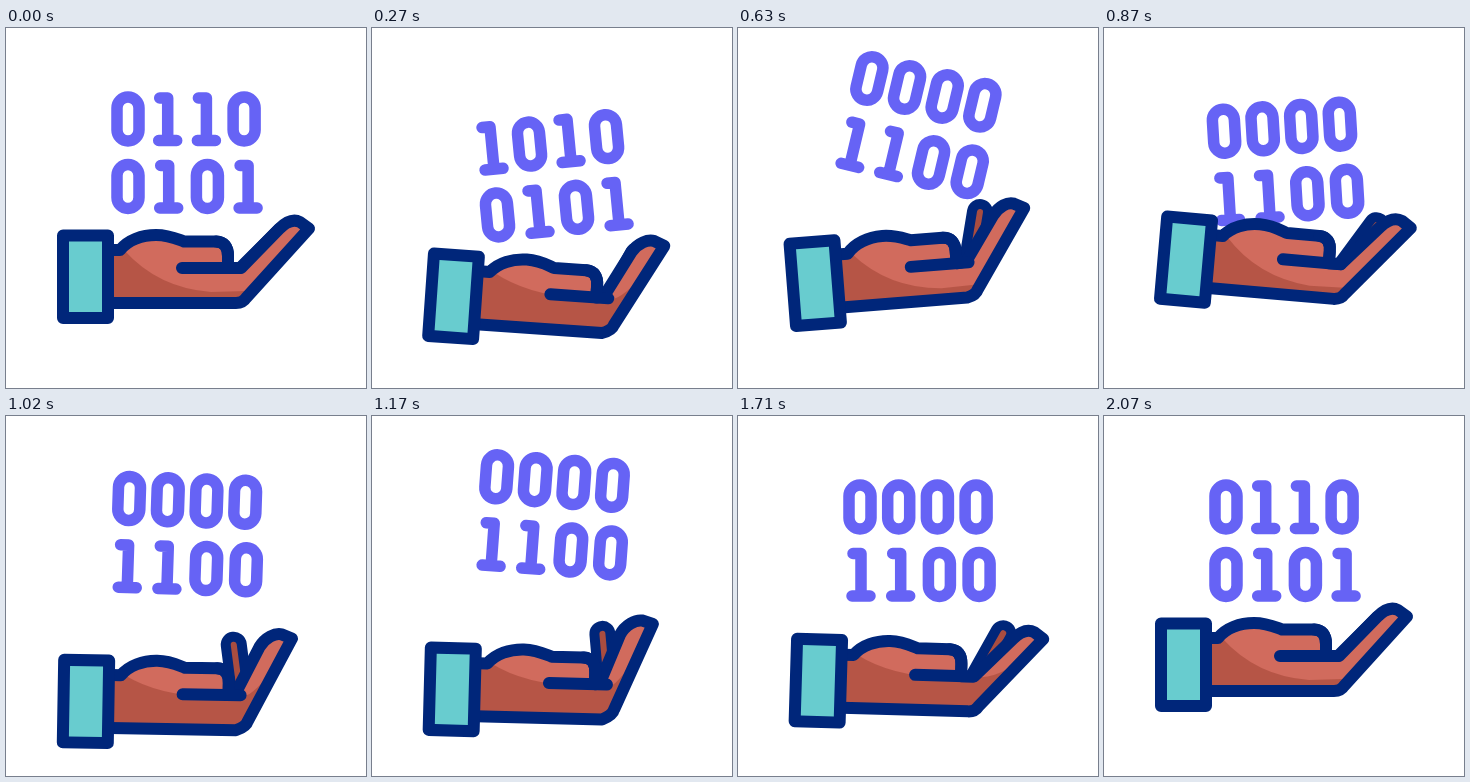
Animation of 360x360 px, one loop 2.1 s. Source, as an HTML page:

```html
<!DOCTYPE html>
<html lang="en">
<head>
<meta charset="utf-8">
<title>Hand tossing binary digits</title>
<style>
  html, body { margin: 0; width: 100%; height: 100%; overflow: hidden; background: #fff; }
  svg { display: block; width: 100vw; height: 100vh; }
  path, rect { stroke-linecap: round; stroke-linejoin: round; }
  .line { fill: none; stroke: #00267a; stroke-width: 12; }
  #digits { fill: none; stroke: #6663f5; stroke-width: 11.5; }
</style>
</head>
<body>
<svg viewBox="0 0 360 360">
  <clipPath id="skin"><path id="skinShape"/></clipPath>
  <g id="digits"></g>
  <g id="hand">
    <path id="backEdge" fill="none" stroke="#00267a" stroke-width="26"/>
    <path id="backFill" fill="none" stroke="#a94d40" stroke-width="6"/>
    <path id="body" fill="#b65546"/>
    <path id="light" fill="#d16b5d" clip-path="url(#skin)"/>
    <path id="outline" class="line"/>
    <path class="line" d="M176 240H234M210 213.500Q222 214 222 228V238"/>
    <rect class="line" x="57" y="207.500" width="45" height="82.500" style="fill:#68cccf"/>
  </g>
</svg>
<script>
const LOOP = 2100, STEP = 30;
const $ = id => document.getElementById(id);
const radians = degrees => degrees * Math.PI / 180;

function ramp(t, from, to) {
  const u = Math.min(1, Math.max(0, (t - from) / (to - from)));
  return u * u * (3 - 2 * u);
}

// Sum of smooth humps, each [centre time, height, half width].
const humps = (t, ...list) => list.reduce((sum, [at, height, half]) => {
  const u = Math.abs(t - at) / half;
  return u < 1 ? sum + height * Math.cos(u * Math.PI / 2) ** 2 : sum;
}, 0);

function poseAt(t) {
  // Three dips of the hand, with one quick lift to meet the falling digits.
  const handY = humps(t, [420, 44, 280], [850, -36, 170], [1040, 37, 330], [1640, 17, 430]);
  const turn = humps(t, [270, 4, 200], [630, -4.5, 210], [870, 5, 200], [1170, 1.5, 200], [1700, 1.7, 300]);
  const digitsY = humps(t, [330, 27, 240], [630, -28, 200], [890, 9, 150], [1170, -26, 230], [1430, 10, 180]);
  return {
    handY, turn, digitsY,
    handX: turn / 2,
    digitsTurn: -0.48 * digitsY * Math.exp(-(((t - 670) / 480) ** 2)),
    bend: humps(t, [300, -14, 300], [640, -8, 230], [1130, -20, 330]),
    spread: (20 + handY / 2) * ramp(t, 150, 550) * (1 - ramp(t, 1500, 2000)),
    shade: ramp(handY, 6, 14)
  };
}

const codes = [[0, "01100101"], [150, "10100101"], [450, "00001100"], [1890, "01100101"]];
const glyphs = {
  0: "M-11 -11A11 11 0 0 1 11 -11V11A11 11 0 0 1 -11 11Z",
  1: "M-7 -21H1V21M-8 21.500H10"
};
const digits = Array.from({ length: 8 }, (_, i) => {
  const path = document.createElementNS("http://www.w3.org/2000/svg", "path");
  const row = Math.floor(i / 4);
  const x = 122 + (i % 4) * (38.7 + row), y = 91 + row * 67.5;
  path.setAttribute("transform", `translate(${x} ${y})`);
  return $("digits").appendChild(path);
});

// Turns a finger point about the knuckle.
function bent(x, y, degrees) {
  const a = radians(degrees), dx = x - 225, dy = y - 262;
  return `${225 + dx * Math.cos(a) - dy * Math.sin(a)} ${262 + dx * Math.sin(a) + dy * Math.cos(a)}`;
}

function handPath(bend) {
  const p = (x, y) => bent(x, y, bend);
  const widen = bend / 4;
  return "M104 222H114C122 212 136 207 150 207C163 207 171 211 178 213.500H210Q222 214 222 228V240" +
    `L${p(235, 240)}L${p(273 + widen, 201)}C${p(281 + widen, 193)} ${p(288, 191)} ${p(294, 194)}` +
    `L${p(303, 200.5)}L${p(240, 270)}Q${p(237, 275)} 230 275H104`;
}

function lightPath(shade, bend) {
  const p = (x, y) => bent(x, y, bend * shade);
  return `M118 222Q152 ${260 - 18 * shade} 205 ${264 - 22 * shade}L240 ${263 - 23 * shade}` +
    `Q${p(258, 263 - 20 * shade)} ${p(300, 263 - 54 * shade)}L325 140H118Z`;
}

function render(t) {
  const pose = poseAt(t);
  const shape = handPath(pose.bend);
  for (const id of ["skinShape", "body", "outline"]) $(id).setAttribute("d", shape);
  $("light").setAttribute("d", lightPath(pose.shade, pose.bend));

  const lift = radians(45 - pose.bend + pose.spread);
  const back = `M235 249L${235 + 60 * Math.cos(lift)} ${249 - 60 * Math.sin(lift)}`;
  for (const id of ["backEdge", "backFill"]) $(id).setAttribute("d", back);

  $("hand").setAttribute("transform",
    `translate(${pose.handX} ${pose.handY}) rotate(${pose.turn} 79 249)`);
  $("digits").setAttribute("transform",
    `translate(0 ${pose.digitsY}) rotate(${pose.digitsTurn} 180 125)`);

  const code = codes.filter(([start]) => start <= t).pop()[1];
  digits.forEach((path, i) => path.setAttribute("d", glyphs[code[i]]));
}

const origin = performance.now();
function tick() {
  const elapsed = (performance.now() - origin) % LOOP;
  render(Math.floor(elapsed / STEP) * STEP);
  requestAnimationFrame(tick);
}
render(0);
requestAnimationFrame(tick);
</script>
</body>
</html>
```
